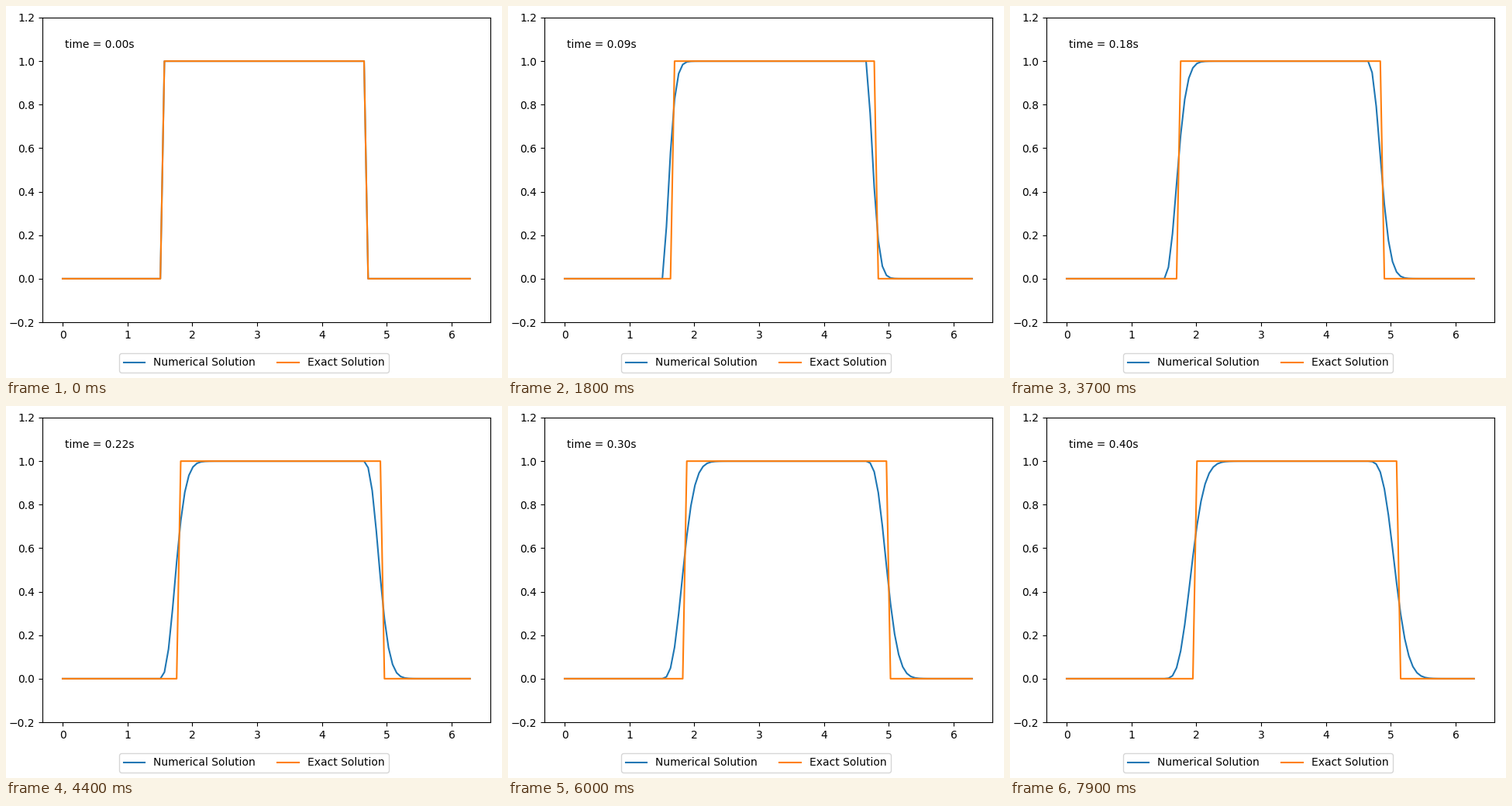
Recreate the animation shown at these times as a matplotlib script. Size 640x480 px, loop 8000 ms.

```python
import numpy as np
import matplotlib.pyplot as plt
from matplotlib.animation import FuncAnimation

# Linear advection of a square pulse: upwind in space, RK4 in time
SPEED = 1.0
CELLS = 100
STEPS = 80
DT = 0.005
EPS = 1e-9

x = np.linspace(0, 2 * np.pi, CELLS + 1)
dx = x[1] - x[0]


def exact(t):
    s = x - SPEED * t + EPS
    return np.where((s >= np.pi / 2) & (s < 3 * np.pi / 2), 1.0, 0.0)


def slope(u):
    du = np.zeros_like(u)
    du[1:] = -SPEED * (u[1:] - u[:-1]) / dx
    return du


def rk4(u):
    k1 = slope(u)
    k2 = slope(u + DT / 2 * k1)
    k3 = slope(u + DT / 2 * k2)
    k4 = slope(u + DT * k3)
    return u + DT / 6 * (k1 + 2 * k2 + 2 * k3 + k4)


numerical = [exact(0)]
for _ in range(STEPS - 1):
    numerical.append(rk4(numerical[-1]))

fig, ax = plt.subplots(figsize=(6.4, 4.8), dpi=100)
num_line, = ax.plot(x, numerical[0], label="Numerical Solution")
exact_line, = ax.plot(x, exact(0), label="Exact Solution")
clock = ax.text(0.05, 0.9, "", transform=ax.transAxes)

# Margins are fitted to the default y range, then the range is widened
fig.tight_layout()
fig.subplots_adjust(bottom=0.15)
ax.set_ylim(-0.2, 1.2)
fig.legend(loc="lower center", ncol=2)


def update(n):
    t = n * DT
    num_line.set_ydata(numerical[n])
    exact_line.set_ydata(exact(t))
    clock.set_text(f"time = {t:.2f}s")
    return num_line, exact_line, clock


anim = FuncAnimation(fig, update, frames=STEPS, interval=100,
                     repeat=True, repeat_delay=0)
plt.show()
```
